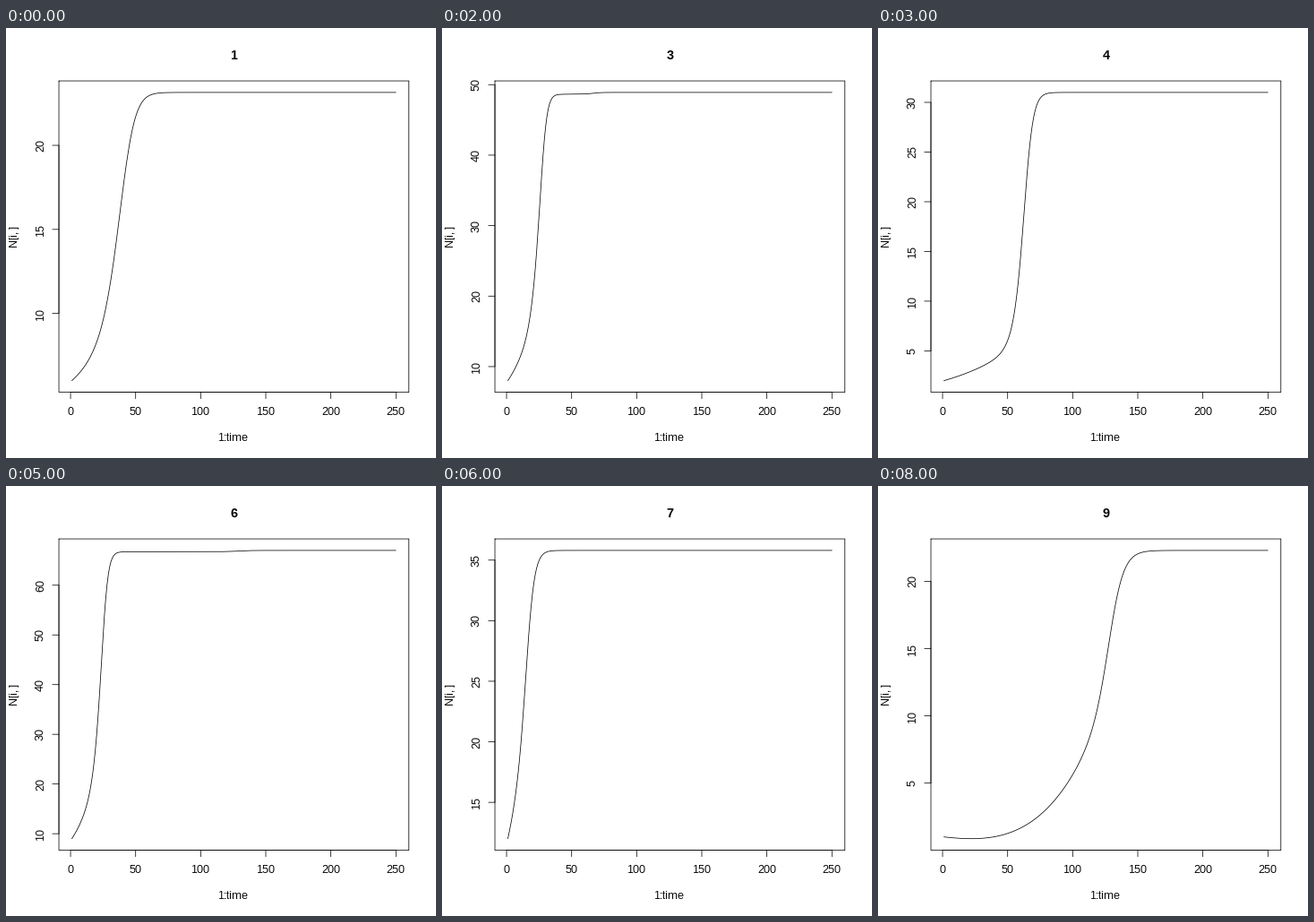
These frames come from a looping animation (480 px wide and 480 px high, 9000 ms). A matplotlib script:

```python
import numpy as np
import matplotlib as mpl
import matplotlib.pyplot as plt
from matplotlib.animation import FuncAnimation

mpl.rcParams.update({
    "font.family": "Liberation Sans",
    "font.size": 12,
    "text.hinting": "native",
    "text.hinting_factor": 1,
})

SIZE, DPI = 480, 72
LEFT, RIGHT, TOP, BOTTOM = 59.04, 449.76, 59.04, 406.56
MID_X, MID_Y = (LEFT + RIGHT) / 2, (TOP + BOTTOM) / 2
TICK = 7.2
LINE = 0.75
T_END = 250
time = np.arange(1, T_END + 1)


def sigmoid(x):
    return 1 / (1 + np.exp(-x))


def softplus(x):
    return np.logaddexp(0, x)


class Species:
    """Logistic growth from start to limit.

    Each ramp (gain, at, width) speeds the growth rate up around one time;
    step (share, at, width) releases the last share of the limit later on.
    """

    def __init__(self, start, limit, rate, *ramps, step=(0, 100, 1)):
        share, at, width = step
        z = np.log(start / (limit * (1 - share) - start)) + rate * (time - 1)
        for gain, mid, w in ramps:
            z = z + gain * w * (softplus((time - mid) / w) - softplus((1 - mid) / w))
        cap = limit * (1 - share * sigmoid((at - time) / width))
        self.n = cap * sigmoid(z)
        self.low, self.span = self.n.min(), np.ptp(self.n)

    def share(self, value):
        return (value - self.low) / self.span

    def ticks(self):
        step = min((1, 2, 5, 10, 20), key=lambda s: abs(np.log(s * 5 / self.span)))
        first = np.ceil((self.low - 0.04 * self.span) / step)
        last = np.floor((self.low + 1.04 * self.span) / step)
        return step * np.arange(first, last + 1)


SPECIES = [
    Species(6, 23.15, .012, (.215, 37, 9)),
    Species(4, 28, .025, (.2, 38, 9)),
    Species(8, 48.9, .04, (.51, 26.3, 4.5), step=(.0052, 66, 3)),
    Species(2, 31, .02, (.3, 58, 5)),
    Species(7, 32, .024, (.27, 31.8, 7), step=(.0047, 65, 4)),
    Species(9, 67, .05, (.45, 23, 4), step=(.004, 128, 5)),
    Species(12, 35.8, .055, (.27, 13.5, 3.5)),
    Species(8, 15.656, .02, (.093, 22, 9), step=(.0161, 127, 9)),
    Species(1, 22.3, -.015, (.052, 33, 12), (.145, 124.5, 6)),
]


def x_pos(t):
    return LEFT + (RIGHT - LEFT) * (.04 + (t - 1) / (T_END - 1)) / 1.08


def y_pos(share):
    return BOTTOM - (BOTTOM - TOP) * (.04 + share) / 1.08


def line(xs, ys):
    return ax.plot(xs, ys, color="black", lw=LINE, snap=False,
                   solid_capstyle="round", solid_joinstyle="round")[0]


def label(x, y, s, **kw):
    return ax.text(x, y, s, ha="center", va="baseline", rotation_mode="anchor", **kw)


fig = plt.figure(figsize=(SIZE / DPI, SIZE / DPI), dpi=DPI, facecolor="white")
ax = fig.add_axes([0, 0, 1, 1])
ax.set(xlim=(0, SIZE), ylim=(SIZE, 0))
ax.axis("off")

line([LEFT, RIGHT, RIGHT, LEFT, LEFT], [TOP, TOP, BOTTOM, BOTTOM, TOP])
line([x_pos(0), x_pos(T_END)], [BOTTOM, BOTTOM])
for t in range(0, T_END + 1, 50):
    line([x_pos(t)] * 2, [BOTTOM, BOTTOM + TICK])
    label(x_pos(t), 432, str(t))
label(MID_X, 461, "1:time")
label(13, MID_Y, "N[i, ]", rotation=90)

title = label(MID_X, 35, "", size=14.4, weight="bold")
curve = line([], [])
marks = []


def draw(i):
    while marks:
        marks.pop().remove()
    sp = SPECIES[i]
    title.set_text(str(i + 1))
    curve.set_data(x_pos(time), y_pos(sp.share(sp.n)))
    values = sp.ticks()
    ys = y_pos(sp.share(values))
    marks.append(line([LEFT, LEFT], [ys[0], ys[-1]]))
    for v, y in zip(values, ys):
        marks.append(line([LEFT - TICK, LEFT], [y, y]))
        marks.append(label(42, y, f"{v:.0f}", rotation=90))
    return [title, curve, *marks]


anim = FuncAnimation(fig, draw, frames=len(SPECIES), init_func=lambda: draw(0),
                     interval=1000, repeat=True, repeat_delay=0)
plt.show()
```
